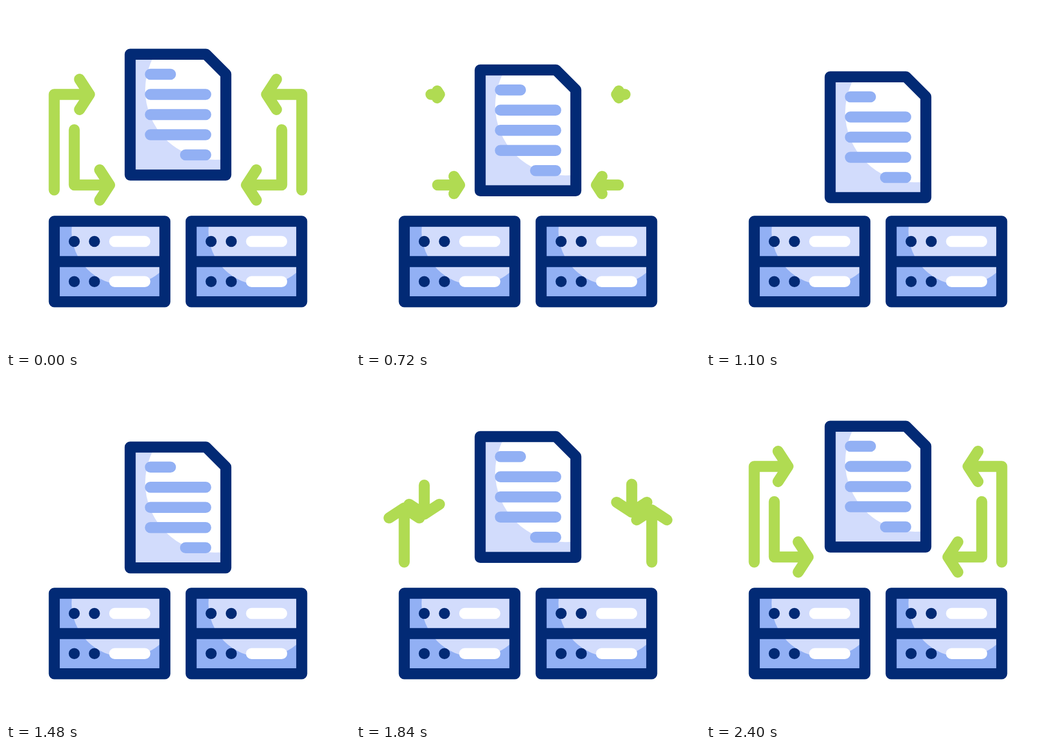
An HTML page for the animation above (2420 ms loop, 640x640 px).

```html
<!DOCTYPE html>
<html lang="en">
<head>
<meta charset="utf-8">
<title>Server file sync</title>
<style>
  html, body { margin: 0; width: 100%; height: 100%; overflow: hidden; background: #fff; }
  svg { display: block; width: 100%; height: 100%; }
  path { fill: none; stroke-width: 20.5; stroke-linecap: round; stroke-linejoin: round; }
  .navy { stroke: #022a75; }
  .dot { fill: #022a75; }
  .pale { fill: #d2dcfc; }
  .mid { fill: #92b0f4; }
  .text { stroke: #92b0f4; }
  .white { stroke: #fff; }
  .arrow { stroke: #b0db52; }
</style>
</head>
<body>
<svg viewBox="0 0 640 640">
  <defs>
    <clipPath id="page"><path d="M231 89.7H372L409 126.7V314.4H231Z"/></clipPath>
    <clipPath id="box"><path d="M89.8 400.6H295.6V550.2H89.8Z"/></clipPath>
    <g id="server">
      <g clip-path="url(#box)">
        <rect class="mid" x="85" y="395" width="215" height="160"/>
        <circle class="pale" cx="222" cy="419" r="100"/>
      </g>
      <path class="navy" d="M89.8 400.6H295.6V550.2H89.8ZM89.8 475.4H295.6"/>
      <g class="dot">
        <circle cx="127" cy="438" r="10.3"/><circle cx="164.5" cy="438" r="10.3"/>
        <circle cx="127" cy="512.8" r="10.3"/><circle cx="164.5" cy="512.8" r="10.3"/>
      </g>
      <path class="white" d="M202.2 438H258.3M202.2 512.8H258.3"/>
    </g>
  </defs>
  <g id="left"></g>
  <g id="right" transform="translate(640) scale(-1 1)"></g>
  <g id="doc">
    <g clip-path="url(#page)">
      <rect class="pale" x="225" y="85" width="190" height="235"/>
      <circle cx="389" cy="156" r="130" fill="#fff"/>
    </g>
    <path class="text" d="M268.6 127H306M268.6 164.5H371.6M268.6 202H371.6M268.6 239.4H371.6M334 276.9H371.6"/>
    <path class="navy" d="M231 89.7H372L409 126.7V314.4H231Z"/>
  </g>
  <use href="#server"/>
  <use href="#server" x="254.6"/>
</svg>
<script>
const LOOP = 2420, TURN = 1205, DROP = 42.5;
const GROW_END = 2440;
const clamp = v => Math.min(1, Math.max(0, v));
const easeOut = (u, p) => 1 - (1 - u) ** p;

// cubic-bezier(.5, 0, .5, 1)
function easeInOut(x) {
  let lo = 0, hi = 1;
  for (let i = 0; i < 24; i++) {
    const s = (lo + hi) / 2;
    if (1.5 * s - 1.5 * s * s + s ** 3 < x) lo = s; else hi = s;
  }
  return lo * lo * (3 - 2 * lo);
}

// Each arrow runs vertically from y to turn, then right to tip.
// lead: how far before its tail the arrow enters; gone, fold: timing of the exit.
const shapes = [
  { x: 89.7, y: 342.5, turn: 164.5, tip: 155.2, lead: 0, gone: 803, fold: 440 },
  { x: 127, y: 230, turn: 333, tip: 192.7, lead: 79, gone: 1040, fold: 480 }
];

const arrows = [];
for (const [id, start] of [['left', 1575], ['right', 1590]]) {
  for (const s of shapes) {
    const el = document.createElementNS('http://www.w3.org/2000/svg', 'path');
    el.setAttribute('class', 'arrow');
    document.getElementById(id).append(el);
    const rise = Math.abs(s.turn - s.y);
    arrows.push({ ...s, el, start, rise, dir: Math.sign(s.turn - s.y), len: rise + s.tip - s.x });
  }
}

function at(a, d) {
  return d < a.rise ? [a.x, a.y + a.dir * d] : [a.x + d - a.rise, a.turn];
}

function trace(a, from, to, size) {
  const [x, y] = at(a, to);
  const back = 18.4 * size, side = 28.2 * size;
  const corner = from < a.rise && to > a.rise ? `L${a.x} ${a.turn}` : '';
  const stem = `M${at(a, from)}${corner}L${x} ${y}`;
  const head = to < a.rise
    ? `M${x - side} ${y - a.dir * back}L${x} ${y}L${x + side} ${y - a.dir * back}`
    : `M${x - back} ${y - side}L${x} ${y}L${x - back} ${y + side}`;
  return stem + head;
}

function arrowPath(a, t) {
  if (t < a.gone) {
    const size = 1 - clamp((t - a.fold) / (a.gone - a.fold));
    return trace(a, a.len * easeOut(t / a.gone, 1.2), a.len, size);
  }
  if (t < a.start) return '';
  const u = (t - a.start) / (GROW_END - a.start);
  const tip = -a.lead + (a.len + a.lead) * easeOut(u, 1.45);
  return trace(a, -a.lead * (1 - u) ** 2.56, tip, 1);
}

const doc = document.getElementById('doc');
function draw() {
  const t = performance.now() % LOOP;
  const x = t < TURN ? t / TURN : (LOOP - t) / (LOOP - TURN);
  doc.setAttribute('transform', `translate(0 ${DROP * easeInOut(x)})`);
  for (const a of arrows) a.el.setAttribute('d', arrowPath(a, t));
  requestAnimationFrame(draw);
}
draw();
</script>
</body>
</html>
```
